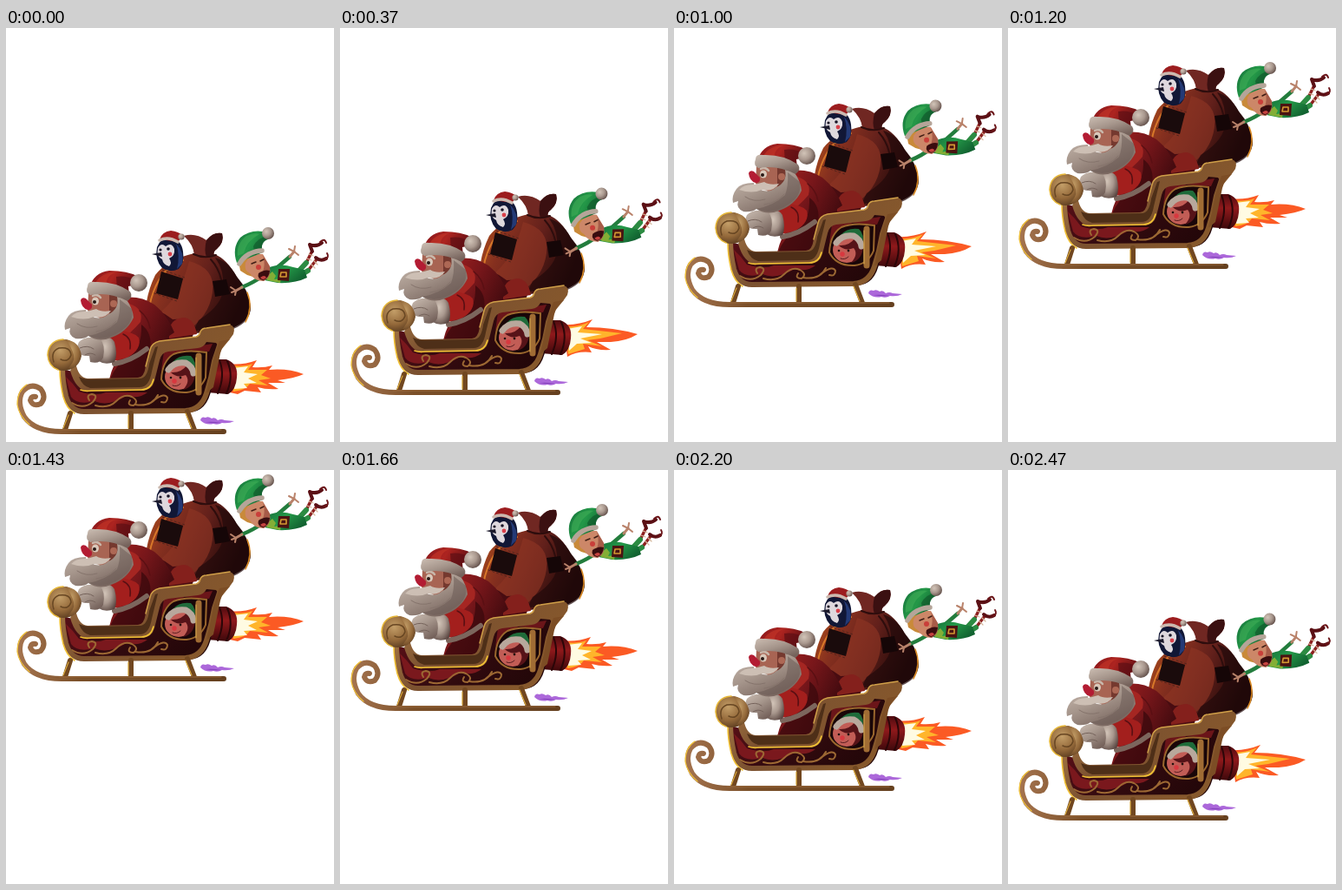
Write an HTML page that moves like this. It is 378x476 px and loops after 2.7 s.

```html
<!DOCTYPE html>
<html lang="en">
<head>
<meta charset="utf-8">
<title>Flying sleigh</title>
<style>
html, body { margin: 0; width: 100%; height: 100%; overflow: hidden; background: #fff; }
svg { display: block; width: 100%; height: 100%; }
.line { fill: none; stroke-linecap: round; stroke-linejoin: round; }
</style>
</head>
<body>
<svg viewBox="0 0 378 476">
<defs>
  <linearGradient id="gold" x2="1" y2=".35">
    <stop stop-color="#a87a45"/><stop offset=".4" stop-color="#7b5130"/><stop offset="1" stop-color="#86582c"/>
  </linearGradient>
  <linearGradient id="runner" gradientUnits="userSpaceOnUse" x1="13" y1="0" x2="254" y2="0">
    <stop stop-color="#a5744f"/><stop offset=".3" stop-color="#7b5029"/><stop offset="1" stop-color="#65401f"/>
  </linearGradient>
  <linearGradient id="sack" x2="1" y2=".35">
    <stop stop-color="#b5541a"/><stop offset=".3" stop-color="#86301f"/><stop offset=".6" stop-color="#62201b"/><stop offset="1" stop-color="#1d0706"/>
  </linearGradient>
  <linearGradient id="coat" x2="1" y2=".6">
    <stop stop-color="#a8211f"/><stop offset=".5" stop-color="#75161a"/><stop offset="1" stop-color="#3a090d"/>
  </linearGradient>
  <linearGradient id="hat" x2="1" y2=".3">
    <stop stop-color="#84151a"/><stop offset=".5" stop-color="#ad2420"/><stop offset="1" stop-color="#601014"/>
  </linearGradient>
  <linearGradient id="beard" x2=".7" y2="1">
    <stop stop-color="#cbbdb2"/><stop offset=".5" stop-color="#a6968c"/><stop offset="1" stop-color="#75625b"/>
  </linearGradient>
  <linearGradient id="body" x2="1" y2=".4">
    <stop stop-color="#67121a"/><stop offset=".5" stop-color="#350b10"/><stop offset="1" stop-color="#240709"/>
  </linearGradient>
  <linearGradient id="barrel" x2="0" y2="1">
    <stop stop-color="#4e0b10"/><stop offset=".4" stop-color="#8f191b"/><stop offset="1" stop-color="#3c080b"/>
  </linearGradient>
  <radialGradient id="ball" cx=".35" cy=".35" r=".75">
    <stop stop-color="#d2c4b8"/><stop offset=".5" stop-color="#a9988e"/><stop offset="1" stop-color="#594641"/>
  </radialGradient>
  <radialGradient id="knob" cx=".4" cy=".35" r=".7">
    <stop stop-color="#c39e68"/><stop offset=".6" stop-color="#94693a"/><stop offset="1" stop-color="#5b3c20"/>
  </radialGradient>
  <linearGradient id="green" x2="1" y2=".5">
    <stop stop-color="#15703a"/><stop offset=".5" stop-color="#249848"/><stop offset="1" stop-color="#126331"/>
  </linearGradient>
</defs>
<g id="scene">
  <path fill="#ac68da" d="M224 451q1-5 6-3 3-2 7 1 4-2 7 2 4-2 8 0l11 1q-6 3-14 2-5 3-10 1-9 2-15-4z"/>
  <path fill="#8746bd" d="M230 453q8-1 18 1-9 1-18-1z"/>

  <g id="flames">
    <g>
      <path fill="#fb5a24" d="M257 386Q272 388 289 382L284 390Q297 391 307 388L303 393Q325 391 343 398 332 403 313 405L322 408 302 408 314 415Q300 416 290 413L294 419 275 417 267 421 258 419Z"/>
      <path fill="#ffb52b" d="M259 388Q274 390 284 386L279 393 301 393 294 399 305 403 291 405 302 411 281 409Q277 416 262 418Z"/>
      <path fill="#fffbe2" d="M262 391L279 389 274 396 290 398 279 403 289 408 274 409 278 414 263 415Z"/>
    </g>
    <g>
      <path fill="#fb5a24" d="M257 386Q274 387 291 380L284 389Q315 389 343 397 330 405 312 406L296 406 312 415Q296 416 286 411L290 418Q274 416 262 423Z"/>
      <path fill="#ffb52b" d="M259 388Q273 390 287 383L280 391 325 396 300 402 285 404 302 411 280 408 282 414 263 420Z"/>
      <path fill="#fffbe2" d="M262 391L279 388 274 395 302 397 277 402 290 407 273 408 264 416Z"/>
    </g>
  </g>
  <path fill="url(#barrel)" d="M232 381H254Q268 386 266 402 265 416 256 421L232 419Z"/>
  <path class="line" stroke="#2b0608" stroke-width="2" d="M246 382q7 18-2 38M255 383q8 18-1 37"/>

  <!-- sack -->
  <path fill="url(#sack)" d="M217 259Q186 266 172 284 157 315 162 345L180 356 258 346Q281 338 282 321 280 303 266 286 254 265 240 260Z"/>
  <path fill="#8e3524" opacity=".65" d="M211 268Q242 276 238 304 234 333 206 350 176 348 180 325 201 307 211 268Z"/>
  <path fill="#22090a" opacity=".7" d="M241 264Q252 279 250 297 252 317 222 336L216 348 262 346Q282 338 282 321 280 301 266 286 256 268 241 264Z"/>
  <path class="line" stroke="#d8782a" stroke-width="2" d="M204 267Q180 276 170 303 164 319 164 335"/>
  <path class="line" stroke="#d98a25" stroke-width="1.5" d="M278 304Q285 321 276 338"/>
  <path fill="#702722" d="M217 261Q216 249 205 239 218 235 231 244 239 234 249 236 252 246 243 254 238 257 240 262 228 267 217 261Z"/>
  <path fill="#3b1011" d="M231 244Q239 234 249 236 252 246 243 254 238 257 240 262L231 264Q228 255 231 244Z"/>
  <path class="line" stroke="#2e0d0d" stroke-width="2" d="M216 260q13 6 26 1M236 266q9 10 12 23"/>
  <path fill="#1a0b0c" d="M179 280L204 288 198 312 173 305Z"/>
  <path fill="#150607" d="M238 291L254 289 258 306 241 309Z"/>
  <path class="line" stroke="#52241b" stroke-dasharray="2 3" d="M180 278L206 287M171 305L197 314"/>

  <!-- penguin -->
  <path fill="#111736" d="M174 252Q178 241 190 241 202 243 204 257 206 270 199 277 189 282 180 276 171 266 174 252Z"/>
  <path fill="#243a76" d="M196 248Q206 258 203 271L197 277Q201 262 196 248Z"/>
  <path fill="#ded8dd" d="M175 253Q179 246 184 251 191 246 194 254 195 262 188 265 192 270 188 274 181 272 180 266 173 263 175 253Z"/>
  <circle cx="178" cy="255" r="1.6" fill="#171326"/><circle cx="187" cy="254" r="1.8" fill="#171326"/>
  <path fill="#1c1a2c" d="M179 258L168 260 180 263Z"/>
  <circle cx="189" cy="260" r="2.4" fill="#d8404b"/>
  <path fill="#9c1d1f" d="M177 243Q180 234 190 233 199 234 204 239L198 246Z"/>
  <path class="line" stroke="#cbb9af" stroke-width="3.5" d="M177 244Q187 239 198 246"/>
  <circle cx="202" cy="240" r="3.6" fill="url(#ball)"/>

  <!-- driver -->
  <path fill="#480c11" d="M158 322Q176 322 192 335 210 333 218 345L214 358 168 370Z"/>
  <path fill="#84201c" d="M188 347Q191 333 206 333 217 335 220 352L188 357Z"/>
  <path fill="url(#coat)" d="M126 312Q151 305 171 318 186 330 194 350L172 365 164 404 119 404Q123 386 133 375L116 350Z"/>
  <path fill="#a52622" d="M142 317Q159 322 155 338 144 351 132 358L120 350Q134 337 142 317Z"/>
  <path fill="#3a090d" opacity=".75" d="M156 341Q169 350 166 370L163 404H120Q127 386 143 376 157 367 156 341Z"/>
  <path fill="#a31f1d" d="M127 348Q145 348 153 356 157 369 140 379L120 384 113 361Z"/>
  <path class="line" stroke="#5a0f13" stroke-width="1.5" d="M135 352q10 4 8 17M154 325q10 8 12 20"/>
  <path class="line" stroke="#7c665d" stroke-width="6" d="M125 386Q144 383 162 369"/>
  <path fill="url(#ball)" d="M108 358Q119 352 125 361 129 376 125 384 114 388 107 383Z"/>
  <path fill="url(#beard)" d="M84 361Q92 353 108 357 115 364 112 379 108 387 97 384L96 377Q83 378 81 369Z"/>
  <path class="line" stroke="#75635b" d="M85 368q9-4 16 1M91 376q6-4 12 0"/>
  <path fill="#a86453" d="M95 305L132 306 134 328 113 337 94 325Z"/>
  <path fill="#75392f" d="M119 305L134 305 136 329 119 335Z"/>
  <path fill="url(#beard)" d="M92 324Q77 324 72 331 66 339 68 347L74 345Q71 353 80 357 90 358 95 354 107 362 121 356 139 350 147 333 146 322 138 311L128 309Q131 323 118 329 109 337 98 331 92 331 92 324Z"/>
  <path fill="#6c5b57" opacity=".55" d="M145 323Q148 338 133 348 113 362 95 354 115 350 128 338 132 328 131 312Z"/>
  <path fill="#cdbfb4" d="M93 326Q81 325 75 332 90 337 101 332 114 335 121 325 110 327 104 323Z"/>
  <path class="line" stroke="#85746c" d="M82 340q10 7 23 3M104 349q15-2 23-12"/>
  <path fill="#b31c33" d="M86 313Q87 309 92 311L99 318Q100 324 94 324 87 322 86 313Z"/>
  <ellipse cx="103" cy="314" rx="4" ry="4.5" fill="#d9c8ba"/><circle cx="102" cy="315" r="2" fill="#291916"/>
  <path class="line" stroke="#c8b7aa" stroke-width="2.5" d="M100 308q5-3 9 2"/>
  <circle cx="124" cy="317" r="4" fill="#ad6855"/>
  <path fill="url(#hat)" d="M96 299Q101 281 119 279 140 279 153 286L151 295 141 297 142 307Z"/>
  <path fill="#c63728" opacity=".6" d="M103 293Q110 281 126 281 117 284 115 294Z"/>
  <path fill="#5d0e14" opacity=".7" d="M127 286Q139 284 150 291L140 297 141 307 128 300Z"/>
  <path fill="url(#beard)" d="M94 297Q94 291 102 292 126 291 143 303 147 309 140 314 119 303 97 307 91 304 94 297Z"/>
  <circle cx="153" cy="293" r="10" fill="url(#ball)"/>

  <!-- sleigh -->
  <path fill="url(#body)" d="M63 392L82 396 96 412 160 411 177 366 222 361 250 357 237 414Q232 441 211 442H88Q71 440 67 421Z"/>
  <path fill="#7a181d" d="M69 401Q78 409 84 418 103 424 115 419L163 419Q153 427 139 423 117 436 102 429 82 434 75 424Z"/>
  <path fill="#6b1519" d="M182 372L238 363 234 372 206 370Q187 377 179 393Z"/>
  <path class="line" stroke="#9c6833" stroke-width="2" d="M76 431Q89 439 100 430 107 422 99 421 92 422 96 428M103 434Q118 438 127 429 136 420 145 424 154 429 147 434 139 434 143 428M149 433Q168 436 175 422M172 427q11-8 14-2 0 7-7 5"/>
  <path fill="#190608" stroke="#9a672d" stroke-width="2" d="M179 404Q180 383 193 375 207 369 231 373L230 402Q224 417 208 419 187 420 179 404Z"/>
  <ellipse cx="199" cy="401" rx="16" ry="15" fill="#c25d56"/>
  <path fill="#561318" d="M190 396Q202 397 209 387L218 397Q217 413 204 416 213 406 207 399 197 403 190 396Z"/>
  <circle cx="190" cy="402" r="1.3" fill="#24100e"/><circle cx="201" cy="402" r="1.4" fill="#24100e"/>
  <circle cx="194" cy="406" r="2.7" fill="#d8383f"/>
  <path class="line" stroke="#591e22" d="M192 411q5 2 9-2"/>
  <path fill="#1f6b3a" d="M192 384Q200 375 213 377 220 383 217 395L207 387Z"/>
  <path class="line" stroke="#b8a89c" stroke-width="7" d="M187 393Q194 383 207 385 215 389 216 397"/>
  <path class="line" stroke="#a06c34" stroke-width="7" stroke-linecap="butt" d="M222 377V419"/>
  <path class="line" stroke="#d9ab4f" d="M219 379V417"/>

  <path class="line" stroke="url(#gold)" stroke-width="6" d="M65 390Q65 406 69 423 74 441 90 441L207 440Q225 439 231 420 237 402 240 383L247 362"/>
  <path fill="url(#gold)" d="M80 384Q83 402 94 403L152 402Q159 402 161 389L166 370Q168 362 177 360L219 355Q223 354 224 349 226 345 231 345L258 341Q265 343 262 352L257 359 248 370 242 362 231 361Q228 367 221 368L187 372Q179 373 177 382L171 406Q168 417 156 417L95 418Q80 416 74 394Z"/>
  <path fill="#4e2f18" d="M84 401Q90 404 98 404L155 403Q163 402 165 386L172 367 175 366 168 395Q165 413 154 413L97 414Q88 412 84 401Z"/>
  <path fill="#7c4d25" d="M246 360L258 358Q250 363 247 374L239 413 231 420 240 378Z"/>
  <path class="line" stroke="#cf9f48" stroke-width="1.5" d="M161 389L166 370Q168 362 177 360L219 355Q223 354 224 349 226 345 231 345L258 341"/>
  <path class="line" stroke="#f0c034" stroke-width="1.6" d="M86 416Q91 418 98 417L156 416Q167 416 170 404M62 393Q62 407 66 424 70 438 79 443"/>
  <circle cx="66" cy="376" r="18" fill="url(#knob)"/>
  <path fill="url(#knob)" d="M68 358Q85 360 87 377 84 392 68 394 80 385 78 376 75 365 68 358Z"/>
  <path class="line" stroke="#684723" stroke-width="1.5" d="M55 384Q51 372 61 368 74 366 75 376 72 385 63 381"/>
  <path class="line" stroke="#e5b637" stroke-width="1.6" d="M66 358Q49 359 48 376 49 389 60 393"/>

  <path class="line" stroke="#714720" stroke-width="6" d="M74 443L68 462M144 443V462M209 441L217 462"/>
  <path class="line" stroke="#d9a93c" stroke-width="1.2" d="M72 445L66 460M141 445V460M207 443L214 460"/>
  <path class="line" stroke="url(#runner)" stroke-width="6" d="M251 464H64Q33 464 21 447 12 430 19 418 29 407 40 415 47 424 40 432 31 436 28 428 29 423 34 424"/>
  <path class="line" stroke="#efc13a" stroke-width="1.3" d="M27 456Q15 446 13 433 13 417 24 410"/>
  <path class="line" stroke="#9a683a" d="M61 462H248"/>

  <!-- flying elf -->
  <g id="elf">
    <g class="line">
      <path stroke="#8d2020" stroke-width="3.5" d="M345 272L352 258M348 279L358 266"/>
      <path stroke="#2c8b42" stroke-width="6" d="M335 282L346 270M335 287L348 279"/>
      <path stroke="#d5b89d" stroke-width="1.2" d="M347 265l5 2M349 260l5 2M352 272l4 4M355 268l4 4"/>
      <path stroke="#5b1015" stroke-width="4" d="M350 249L353 257M350 249Q358 252 364 247M357 264Q363 269 369 265"/>
      <path stroke="#6b1519" stroke-width="2" d="M362 246q5-5 7 1M367 266q6-2 3-7"/>
      <path stroke="#237d3d" stroke-width="4.5" d="M299 283Q285 293 272 298M313 275L327 263"/>
      <path stroke="#b9826a" stroke-width="3" d="M272 298L265 302M327 263L332 257"/>
      <path stroke="#b9826a" stroke-width="2" d="M265 302l-6-4M265 302l-5 2M265 302l-1 5M332 257l-6-3M332 257l1-6M332 257l5 4"/>
    </g>
    <path fill="url(#green)" d="M299 277Q315 269 331 275L344 278 347 287Q333 294 313 293L298 290Z"/>
    <path fill="#83ae36" d="M300 286l7-6 4 5-2 4 8-1-1 5-15-3z"/>
    <path fill="#4a1412" d="M314 277L327 277 326 291 313 290Z"/>
    <path class="line" stroke="#d49932" stroke-width="1.6" d="M317 281h6v5h-7z"/>
    <path fill="#c98a3a" d="M268 268Q278 259 290 264L288 287 278 284 270 279Z"/>
    <path fill="#cc8768" d="M276 270Q283 258 296 260L304 274Q306 287 297 291 286 291 281 282 274 279 276 270Z"/>
    <path fill="#8d3e34" opacity=".6" d="M296 261L304 274Q306 287 297 291L291 289Q301 276 296 261Z"/>
    <path fill="#3a0d0f" d="M291 282Q298 277 304 279 303 288 296 290 289 288 291 282Z"/>
    <path fill="#c74340" d="M293 287q5-4 7 0-4 4-7 0z"/>
    <path class="line" stroke="#3f1d15" stroke-width="1.5" d="M283 271l5-2M293 268l4-2"/>
    <circle cx="291" cy="275" r="3" fill="#c93f3a"/>
    <path fill="url(#green)" d="M266 270Q260 253 270 241 284 229 305 236L302 243Q292 246 296 258Z"/>
    <path fill="#3fae56" opacity=".6" d="M267 262Q265 248 277 239 285 236 292 237 277 245 274 259Z"/>
    <path fill="#0d5128" opacity=".6" d="M285 251Q290 241 302 239L300 243Q293 249 295 258L287 261Z"/>
    <path class="line" stroke="#b5a599" stroke-width="5.5" d="M269 271Q273 264 280 260 288 256 295 256"/>
    <circle cx="302" cy="236" r="7" fill="url(#ball)"/>
  </g>
</g>
</svg>
<script>
const LOOP = 2700;
// start time, vertical offset, strong flame (0 or 1)
const poses = [
  [0, 0, 0], [170, -21, 0], [370, -45, 1], [570, -76, 1],
  [770, -112, 0], [1000, -146, 1], [1200, -190, 0], [1430, -224, 0],
  [1660, -190, 0], [1930, -146, 1], [2200, -98, 0], [2470, -64, 1]
];
const scene = document.getElementById("scene");
const elf = document.getElementById("elf");
const flames = [...document.getElementById("flames").children];

function draw(time) {
  const [, rise, strong] = poses.findLast(([start]) => start <= time % LOOP);
  scene.setAttribute("transform", `translate(0 ${rise})`);
  elf.setAttribute("transform", `rotate(${-strong} 280 270)`);
  flames.forEach((flame, i) => flame.setAttribute("display", i === strong ? "inline" : "none"));
}

const begin = performance.now();
function tick() {
  draw(performance.now() - begin);
  requestAnimationFrame(tick);
}
tick();
</script>
</body>
</html>
```
